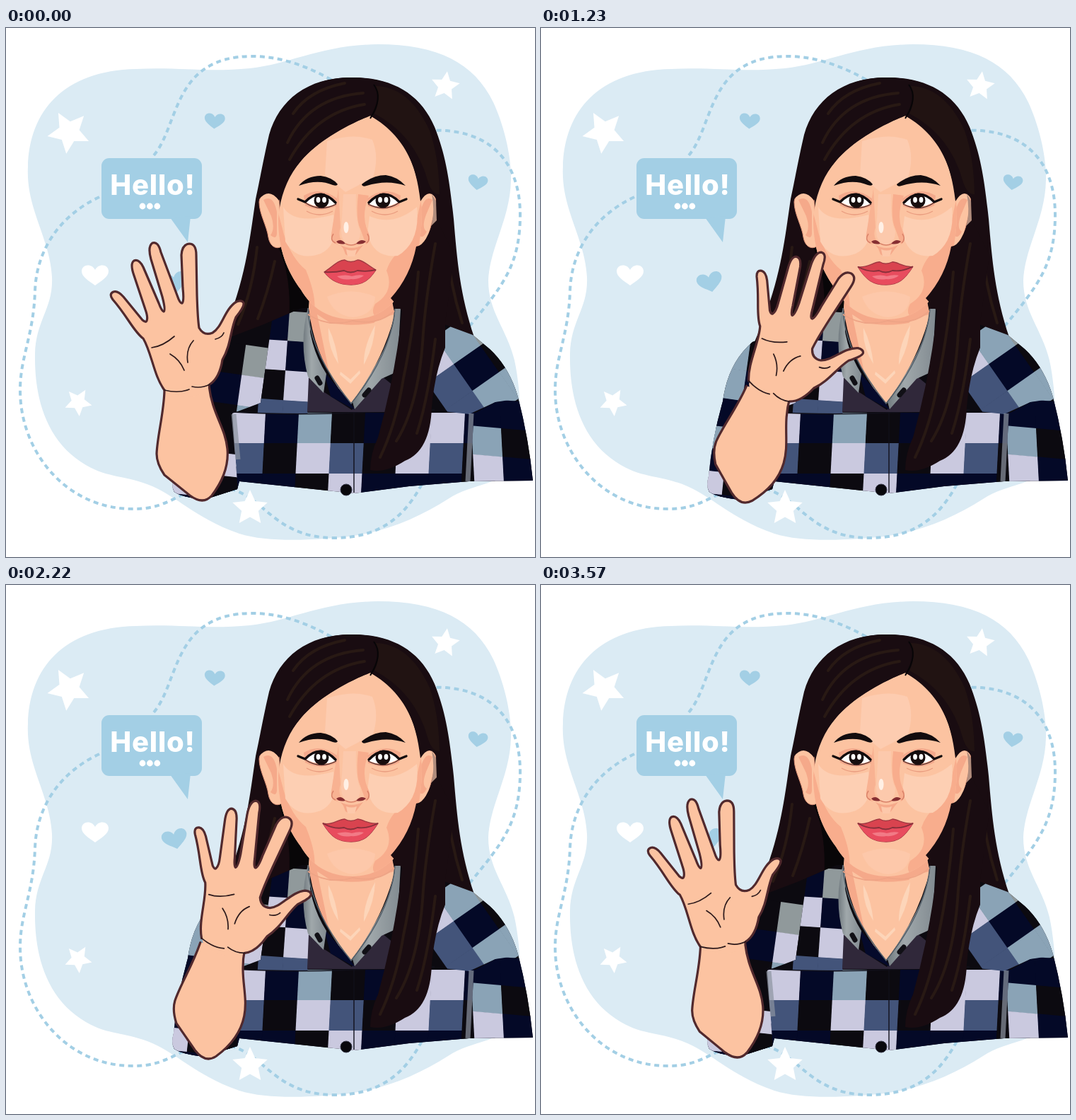
These frames come from a looping animation (748x748 px, 3600 ms). An HTML page:

```html
<!DOCTYPE html>
<html lang="en">
<head>
<meta charset="utf-8">
<title>Hello</title>
<style>
html, body { margin: 0; width: 100%; height: 100%; overflow: hidden; background: #fff; }
svg { display: block; width: 100vw; height: 100vh; }
.dash { fill: none; stroke: #a3cfe5; stroke-width: 4; stroke-dasharray: 7 5.5; }
.limb { fill: #fcc3a1; stroke: #51292d; stroke-width: 3.2; stroke-linejoin: round; stroke-linecap: round; }
.crease { fill: none; stroke: #2c191b; stroke-width: 1.7; stroke-linecap: round; }
.streak { fill: none; stroke: #281914; stroke-width: 4; stroke-linecap: round; }
.hello { font: 800 40px Inter, "Open Sans", sans-serif; letter-spacing: .8px; fill: #fff; text-anchor: middle; }
</style>
</head>
<body>
<svg viewBox="0 0 748 748">
  <defs>
    <path id="shirtShape" d="M299 444 L362 420 L418 396 H428 Q436 470 487 532 Q535 470 552 396 L622 420 L660 434 L684 454 Q712 480 724 522 Q739 580 745 640 L655 641 L570 648 L492 658 L330 641 L327 652 L280 667 Q250 664 238 656 Q233 648 237 634 Q242 580 257 528 Q264 474 299 444Z"/>
    <clipPath id="shirt"><use href="#shirtShape"/></clipPath>
    <clipPath id="sleeveL"><path d="M220 430 L376 414 L360 530 L320 545 L329 670 H220Z"/></clipPath>
    <clipPath id="yokeL"><path d="M376 414 L430 390 V545 H320 L360 530Z"/></clipPath>
    <clipPath id="yokeR"><path d="M600 410 H760 V525 L692 529 L655 546 L600 540Z"/></clipPath>
    <clipPath id="sleeveR"><path d="M662 545 L692 529 L750 520 V645 H655Z"/></clipPath>
    <path id="faceShape" d="M515 124 C480 138 441 160 417 188 C398 210 387 240 385 270 C385 313 397 343 417 370 C432 396 456 412 490 412 C524 412 548 393 563 367 C581 338 588 300 588 255 C584 210 572 157 515 124Z"/>
    <clipPath id="face"><use href="#faceShape"/></clipPath>
    <linearGradient id="collar">
      <stop offset="0" stop-color="#727b80"/><stop offset=".35" stop-color="#a0a8ab"/><stop offset="1" stop-color="#828b91"/>
    </linearGradient>
    <path id="heart" d="M0 14 C-8 8 -19 2 -19 -6 C-19 -16 -5 -18 0 -8 C5 -18 19 -16 19 -6 C19 2 8 8 0 14Z"/>
  </defs>

  <path fill="#dbebf4" d="M31 196 C33 118 81 60 184 58 C242 55 285 63 345 57 C402 51 445 24 526 23 C610 23 662 49 689 105 C703 135 715 180 714 215 C713 270 684 310 682 357 C682 402 708 425 719 470 C729 516 731 585 716 617 C700 648 660 643 625 666 C585 691 540 712 485 719 C440 724 370 728 330 715 C270 694 245 665 207 648 C170 632 145 637 113 618 C55 584 40 520 41 461 C42 413 67 397 65 352 C62 296 28 256 31 196Z"/>
  <g class="dash">
    <path d="M209 180 C245 138 235 40 348 40 C390 40 430 55 470 79"/>
    <path d="M596 145 C685 140 727 190 727 264 C727 335 702 365 656 421"/>
    <path d="M132 239 C78 264 43 312 41 372 C39 435 20 465 20 512 C20 600 86 681 181 680 C235 680 244 650 297 650 C362 647 370 721 464 721 C530 721 564 690 588 645"/>
  </g>
  <g id="stars" fill="#fff"></g>
  <use href="#heart" fill="#fff" transform="translate(126 350)"/>
  <g fill="#a3cfe5">
    <use href="#heart" transform="translate(295 132) rotate(4) scale(.76)"/>
    <use href="#heart" transform="translate(667 219) rotate(8) scale(.73)"/>
    <use href="#heart" transform="translate(239 360) rotate(-14) scale(.95)"/>
    <rect x="135" y="184" width="142" height="86" rx="11"/>
    <path d="M232 268 L257 303 L261 266Z"/>
  </g>
  <text class="hello" x="207.500" y="236">Hello!</text>
  <path stroke="#fff" stroke-width="8.800" stroke-linecap="round" stroke-dasharray="0 10.400" d="M193 252 H215"/>

  <!-- hair behind -->
  <path fill="#190c11" d="M490 70 C428 69 386 101 372 151 C363 190 359 215 353 242 C343 310 338 362 301 446 L420 430 H560 L662 437 C642 377 638 330 633 270 C627 215 622 180 606 140 C586 93 546 70 490 70Z"/>
  <path class="streak" d="M355 310 Q349 370 328 419 M380 330 Q370 375 356 411 M622 300 Q627 360 645 417"/>
  <path fill="#080608" d="M388 305 L430 385 V425 L400 420 Q405 350 384 308Z"/>

  <!-- neck -->
  <path fill="#fcc3a1" d="M429 382 H545 L555 430 L490 536 L424 450Z"/>
  <path fill="#f5a98a" d="M429 383 H545 L549 405 Q525 411 520 417 Q485 423 457 416 L440 405 L458 492 L427 445Z"/>
  <path fill="#fdd5b9" d="M456 424 Q454 450 470 475 Q467 446 456 424Z M522 420 Q505 451 506 476 Q521 449 522 420Z M473 486 L487 497 L500 484 L501 488 L487 503 L472 490Z"/>

  <!-- shirt -->
  <use href="#shirtShape" fill="#0c0a10"/>
  <g id="plaid" clip-path="url(#shirt)"></g>
  <path fill="none" stroke="#11101a" stroke-width="1.4" d="M320 543 Q410 548 490 544 L606 540 M492 533 V657"/>
  <path fill="none" stroke="#8d94a2" stroke-width="7" opacity=".7" d="M658 545 L653 641 M322 546 L328 610"/>
  <path fill="#30283a" d="M428 494 L450 515 L489 540 L531 492 L548 506 L545 543 H426Z"/>
  <path fill="#050a2b" d="M449 485 L486 528 L493 540 L459 521Z"/>
  <path fill="url(#collar)" d="M427 395 Q414 446 427 493 L449 516 L453 489 Q427 448 427 395Z"/>
  <path fill="url(#collar)" d="M550 397 Q550 442 490 529 L493 539 L531 496 L553 486 L558 397Z"/>
  <path fill="none" stroke="#55606a" stroke-width="1.6" d="M427 396 Q428 457 488 531 Q545 460 550 397"/>
  <path stroke="#111016" stroke-width="7" stroke-linecap="round" d="M440 495 L444 502 M507 519 L513 512"/>
  <circle cx="481" cy="653" r="8" fill="#09080c" stroke="#343545"/>

  <!-- ears -->
  <g fill="#fcc3a1" stroke="#dd9277" stroke-width="1">
    <path d="M386 243 C374 227 360 229 358 246 C358 263 369 280 371 296 C374 312 385 313 391 308Z"/>
    <path d="M585 244 C594 229 608 231 608 247 C606 265 600 281 597 296 C594 311 584 313 579 307Z"/>
  </g>
  <path fill="#f5a98a" d="M364 243 Q378 235 383 260 V291 Q382 300 374 293 Q381 283 375 266Z M603 243 Q592 235 586 260 L583 292 Q589 300 595 288 Q587 283 594 264Z"/>

  <!-- face -->
  <use href="#faceShape" fill="#fcc3a1"/>
  <g clip-path="url(#face)">
    <path fill="#fdccb0" d="M454 160 Q490 148 518 158 Q528 182 519 211 L499 222 L480 232 L451 208Z"/>
    <path fill="#f8ad8d" d="M590 230 V390 L534 416 Q512 407 522 390 Q550 373 538 343 Q545 320 574 301Z"/>
    <path fill="#f8ad8d" d="M381 246 L393 292 Q404 326 424 342 Q439 379 436 400 L382 350Z"/>
    <path fill="#fdcfb3" d="M392 253 Q407 279 463 264 Q472 306 445 319 Q411 331 395 302Z"/>
    <path fill="#fdcfb3" d="M514 266 Q548 281 581 253 Q586 303 554 322 Q520 326 511 291Z"/>
    <path fill="#fdc8aa" d="M454 380 Q488 365 522 380 Q520 407 490 409 Q463 406 454 380Z"/>
    <path fill="#f8b292" d="M470 227 Q464 266 460 291 Q458 303 468 306 L475 302 Q469 293 473 282Z"/>
    <path fill="#f8ad8d" d="M498 235 Q494 270 501 284 L509 306 Q518 300 511 286 Q502 265 513 237Z"/>
    <path fill="#fcc9ac" d="M477 235 H495 Q494 274 501 287 Q501 305 488 307 Q474 304 474 287Z"/>
    <path fill="#f5a98a" d="M473 307 Q488 315 505 307 L500 313 L495 320 Q487 326 480 320 L477 312Z"/>
    <path fill="#fdc8aa" d="M481 313 Q489 316 496 313 L493 323 H483Z"/>
  </g>
  <ellipse cx="481" cy="282" rx="3.500" ry="8" fill="#fff0e5"/>
  <path fill="#862f32" d="M467 302 Q474 297 480 305 Q471 307 467 302Z M495 305 Q502 297 509 302 Q504 307 495 305Z"/>
  <path fill="none" stroke="#d98269" stroke-width="1.500" d="M463 291 Q457 300 466 304 M511 291 Q516 299 510 304 M480 305 Q488 309 496 305"/>
  <path fill="none" stroke="#eea486" stroke-width="1.800" d="M427 405 Q456 424 490 414 Q526 421 549 400"/>

  <!-- brows and eyes -->
  <path fill="#120c0e" d="M414 223 Q425 209 445 209 Q461 211 469 221 Q468 224 462 222 Q441 213 414 223Z M503 221 Q519 208 537 208 Q553 210 565 223 Q539 214 510 223 Q504 225 503 221Z"/>
  <g id="eye">
    <path fill="#f3a98c" d="M421 237 Q444 223 468 241 L467 252 Q443 262 423 251Z"/>
    <path fill="#fff" d="M422 245 Q444 225 467 248 Q444 259 422 245Z"/>
    <circle cx="446" cy="244" r="10.500" fill="#170d0e"/>
    <path fill="none" stroke="#120c0e" stroke-width="3.400" stroke-linecap="round" d="M413 242 L423 246 Q444 224 466 247"/>
    <path fill="none" stroke="#4e2927" stroke-width="1.300" d="M423 247 Q444 261 467 249"/>
    <g fill="#fff"><ellipse cx="441.500" cy="243" rx="2.900" ry="4"/><ellipse cx="450" cy="243" rx="2.900" ry="4"/></g>
    <path fill="none" stroke="#e99c7f" stroke-width="1.300" d="M425 259 Q443 269 462 259"/>
  </g>
  <use href="#eye" transform="translate(979 0) scale(-1 1)"/>

  <path id="lips" fill="#d9434f" stroke="#a13942" stroke-width="1.300" stroke-linejoin="round"/>
  <path id="lower" fill="#e84c5e"/>
  <path id="seam" fill="none" stroke="#86303a" stroke-width="1.800"/>
  <path fill="#f27a86" d="M468 351 Q481 348 489 351 Q499 348 506 350 Q499 356 488 355 Q475 357 468 351Z"/>

  <!-- hair in front -->
  <path fill="#190c11" d="M515 124 C480 138 441 160 417 188 C399 210 389 226 386 244 Q372 225 358 242 C365 198 366 154 391 117 C418 79 455 70 490 70 C548 70 588 98 606 141 C617 170 625 218 630 255 L632 320 L609 278 L608 241 Q598 225 586 245 C580 190 562 149 515 124Z"/>
  <path fill="#211312" d="M521 82 Q570 82 599 145 Q612 182 613 235 Q602 236 596 215 Q578 151 521 121 Q531 100 521 82Z"/>
  <path class="streak" d="M505 92 Q428 98 398 162 M507 108 Q438 119 401 186 M479 78 Q428 88 406 121"/>
  <path fill="none" stroke="#070507" stroke-width="2" d="M520 80 Q534 98 515 128"/>
  <path fill="#190c11" d="M606 265 Q595 308 580 309 Q572 351 544 382 L560 400 Q552 484 526 579 Q515 602 515 625 Q536 630 564 612 Q600 598 602 536 Q606 489 621 452 V416 L634 321Z"/>
  <path class="streak" d="M607 305 Q592 390 589 446 Q582 536 552 584 M583 345 Q576 430 562 495 Q552 559 529 607 M607 440 Q597 524 581 573"/>
  <path fill="#b18d7d" d="M602 234 L608 245 L609 272 L601 280 Q607 260 602 234Z"/>

  <g id="arm">
    <path class="limb" d="M224 513 C223 546 214 576 213 602 Q213 616 224 632 L260 661 Q279 675 291 661 C307 640 315 617 313 595 C310 564 291 545 287 505"/>
    <ellipse cx="256" cy="507" rx="30" ry="14" fill="#fcc3a1"/>
    <g id="hand">
      <path class="limb" d="M224 512 C209 492 206 459 194 439 C181 430 172 408 151 384 Q145 376 152 373 Q158 371 166 380 L193 413 Q198 417 199 414 Q201 409 197 398 L181 350 Q175 333 181 329 Q188 326 194 338 L216 389 Q220 400 223 401 Q226 399 221 380 L205 327 Q200 309 207 304 Q215 301 219 317 L242 378 Q246 390 249 389 Q252 386 250 368 L248 321 Q249 306 259 305 Q269 305 269 321 L270 377 Q271 411 273 424 Q280 436 292 431 C306 423 309 397 326 387 Q334 384 336 389 Q337 394 325 409 C317 428 318 449 306 469 Q302 495 288 504"/>
      <path class="crease" d="M206 452 Q222 450 238 436 M232 461 Q246 469 252 484 M265 442 Q254 454 257 473 M296 440 Q305 438 308 431 M224 512 Q244 517 259 511 M263 507 Q276 510 288 504"/>
    </g>
  </g>
</svg>
<script>
const $ = id => document.getElementById(id);

function add(parent, tag, attrs) {
  const el = document.createElementNS("http://www.w3.org/2000/svg", tag);
  for (const key in attrs) el.setAttribute(key, attrs[key]);
  return parent.appendChild(el);
}

function star(x, y, r, turn) {
  const points = Array.from({ length: 10 }, (_, i) => {
    const a = (turn + i * 36) * Math.PI / 180, d = i % 2 ? r * 0.48 : r;
    return [x + d * Math.cos(a), y + d * Math.sin(a)];
  });
  add($("stars"), "polygon", { points: points.join(" ") });
}
star(89, 147, 31, 97);
star(621, 82, 21, -82);
star(102, 529, 20, 85);
star(345, 679, 26, -90);

const cloth = { n: "#040927", k: "#0c0a10", l: "#cac9df", b: "#8aa3b6", m: "#43547a", g: "#90999b" };

// a turned grid of squares; each word is one row, repeated across
function weave(clip, place, w, h, cols, rows) {
  const panel = add($("plaid"), "g", clip ? { "clip-path": `url(#${clip})` } : {});
  const grid = add(panel, "g", { transform: place });
  rows.split(" ").forEach((row, r) => {
    for (let c = 0; c < cols; c++) {
      add(grid, "rect", { x: c * w, y: r * h, width: w + 0.5, height: h + 0.5, fill: cloth[row[c % row.length]] });
    }
  });
}
weave("", "translate(320 544) skewX(-3)", 47, 43, 8, "lnbknl mklmkl nnkln");
weave("sleeveL", "translate(254 436) rotate(8)", 43, 43, 3, "bkg bnl nkb bkl lkn nnn");
weave("sleeveL", "translate(222 560) rotate(6)", 44, 32, 3, "bkk nnl lkk nnn");
weave("yokeL", "translate(366 398) rotate(4)", 35, 42, 2, "ng ln kl mm");
weave("yokeR", "translate(569 464) rotate(-35)", 46, 46, 4, "lbgg mnkb mbbb");
weave("sleeveR", "translate(656 522) rotate(5) skewX(8)", 42, 40, 3, "nnn bkm lnl");

// the mouth starts full and widens into a smile
function drawMouth(s) {
  const mix = (a, b) => a + (b - a) * s;
  const left = `${mix(450, 448)} ${mix(345, 337)}`, right = `${mix(523, 526)} ${mix(342, 337)}`;
  const top = mix(328, 331);
  const seam = `M${left} Q464 346 478 343 Q487 348 497 343 Q510 345 ${right}`;
  const chin = `C514 356 505 363 488 363 C470 363 460 357 ${left}Z`;
  $("lips").setAttribute("d", `M${left} C462 ${top + 9} 470 ${top} 479 ${top} Q487 ${top + 5} 497 ${top} C505 ${top} 512 ${top + 8} ${right} ${chin}`);
  $("lower").setAttribute("d", seam + chin);
  $("seam").setAttribute("d", seam);
}

const LOOP = 3600, STEP = 30, WAVE = 1791, SMILE = 1500;

function draw(now) {
  const t = Math.floor(now % LOOP / STEP) * STEP;
  const swing = 1 - Math.abs(t % WAVE / WAVE * 2 - 1);
  $("arm").setAttribute("transform", `rotate(${34.5 * swing} 275 684)`);
  $("hand").setAttribute("transform", `rotate(${20 * swing} 256 509)`);
  const p = Math.min(t / SMILE, 1);
  drawMouth(p * p * (3 - 2 * p));
}

const start = performance.now();
function tick() {
  draw(performance.now() - start);
  requestAnimationFrame(tick);
}
tick();
</script>
</body>
</html>
```
